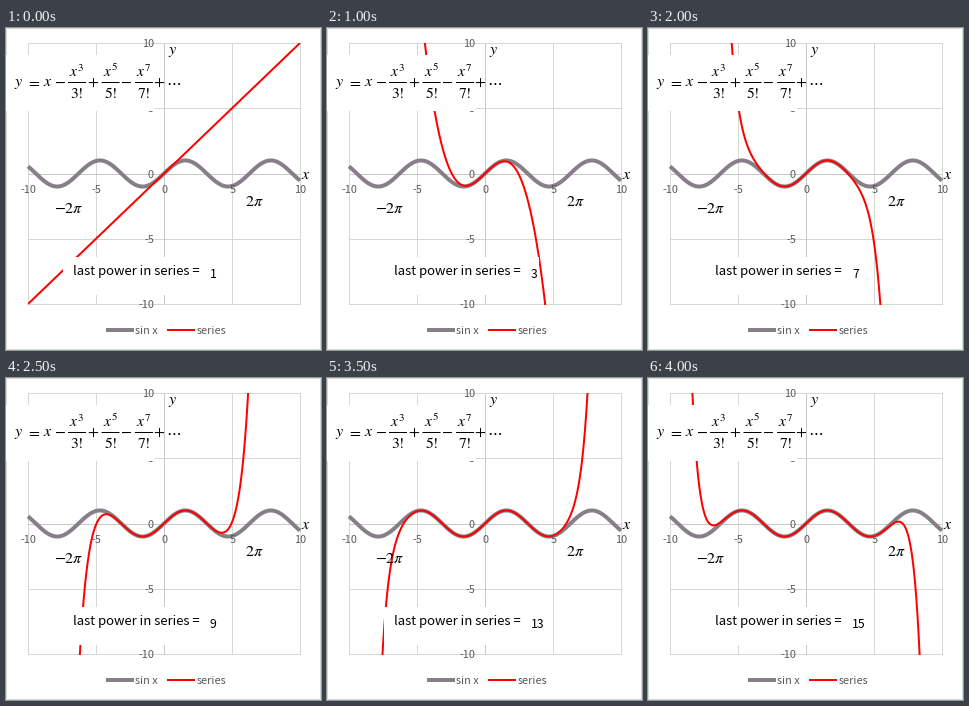
A matplotlib script for the animation above (5000 ms loop, 315 by 322 pixels).

```python
import math

import matplotlib.pyplot as plt
import numpy as np
from matplotlib.animation import FuncAnimation
from matplotlib.patches import Rectangle

plt.rcParams["mathtext.fontset"] = "stix"
plt.rcParams["font.family"] = "Noto Sans CJK JP"

W, H, DPI = 315, 322, 100
LEFT, RIGHT, TOP, BOTTOM = 22, 294, 15, 276
CX, CY = (LEFT + RIGHT) / 2, (TOP + BOTTOM) / 2
SX, SY = (RIGHT - LEFT) / 20, (BOTTOM - TOP) / 20
GRID, AXIS, LABEL = "#d3d9d3", "#c6cac6", "#595959"
SINE, RED = "#877f88", "#ff0000"

# last power shown during each half second
POWERS = [1, 1, 3, 5, 7, 9, 11, 13, 15, 15]


def pt(px):
    return px * 72 / DPI


fig = plt.figure(figsize=(W / DPI, H / DPI), dpi=DPI, facecolor="white")
ax = fig.add_axes([0, 0, 1, 1])
ax.set_xlim(0, W)
ax.set_ylim(H, 0)
ax.axis("off")


def line(xs, ys, color, width, z):
    return ax.plot(xs, ys, color=color, lw=pt(width), zorder=z, snap=False,
                   solid_capstyle="butt", solid_joinstyle="round")[0]


def label(x, y, s, size=10.9, color=LABEL, ha="center", z=4.5):
    return ax.text(x, y, s, fontsize=pt(size), color=color, ha=ha,
                   va="baseline", zorder=z)


def math_label(x, y, s, size=16):
    return label(x, y, f"${s}$", size, "black", z=8)


def cover(x, y, w, h):
    ax.add_patch(Rectangle((x, y), w, h, fc="white", ec="none", zorder=5))


def series(x, power):
    return sum((-1) ** (n // 2) * x ** n / math.factorial(n)
               for n in range(1, power + 1, 2))


# chart border, grid and axes
ax.add_patch(Rectangle((0.5, 0.5), W - 1, H - 1, fc="none", ec=GRID,
                       lw=pt(1), zorder=1, snap=False))
for v in range(-10, 11, 5):
    color = AXIS if v == 0 else GRID
    gx = math.floor(CX + v * SX) + 0.5
    gy = math.floor(CY - v * SY + 0.5) + 0.5
    line([gx, gx], [TOP, BOTTOM + 1], color, 1, 2)
    line([LEFT, RIGHT + 1], [gy, gy], color, 1, 2)
    label(gx, CY + 19, str(v))
    label(148, gy + 3, str(v), ha="right")

# curves
t = np.linspace(-10, 10, 1601)
px = CX + t * SX
line(px, CY - np.sin(t) * SY, SINE, 4, 3)
curve = line([], [], RED, 2, 4)
curve.set_clip_path(Rectangle((LEFT, TOP), RIGHT - LEFT + 1,
                              BOTTOM - TOP + 1, transform=ax.transData))

# formula
cover(0, 27, 149, 56)
for x, s in ((12.5, "y"), (27.5, "="), (41.5, "x"), (53.5, "-"), (87, "+"),
             (119.5, "-"), (153, "+"), (167.5, r"\cdots")):
    math_label(x, 58, s)
for x, n in ((71, 3), (104.5, 5), (138, 7)):
    math_label(x, 48.5, f"x^{n}", 15.5)
    math_label(x, 69.5, f"{n}!", 15.5)
    line([x - 9, x + 9], [54.5, 54.5], "black", 1, 8)

math_label(166.5, 26, "y")
math_label(300, 151, "x")
math_label(63, 185, r"-2\pi")
math_label(248, 178, r"2\pi")

# caption and counter
cover(57, 229, 155, 38)
label(67, 247, "last power in series =", 13.1, "black", "left", 8)
counter = label(204, 250, "", 12.2, "black", "left", 8)

# legend
line([100, 128], [302, 302], SINE, 4, 3)
label(129, 306, "sin x", ha="left")
line([161, 189], [302, 302], RED, 2, 3)
label(191, 306, "series", ha="left")


def draw(i):
    power = POWERS[i]
    y = np.clip(series(t, power), -40, 40)
    curve.set_data(px, CY - y * SY)
    counter.set_text(str(power))
    return curve, counter


anim = FuncAnimation(fig, draw, frames=len(POWERS), interval=500,
                     init_func=lambda: draw(0), repeat=True, repeat_delay=0)
plt.show()
```
